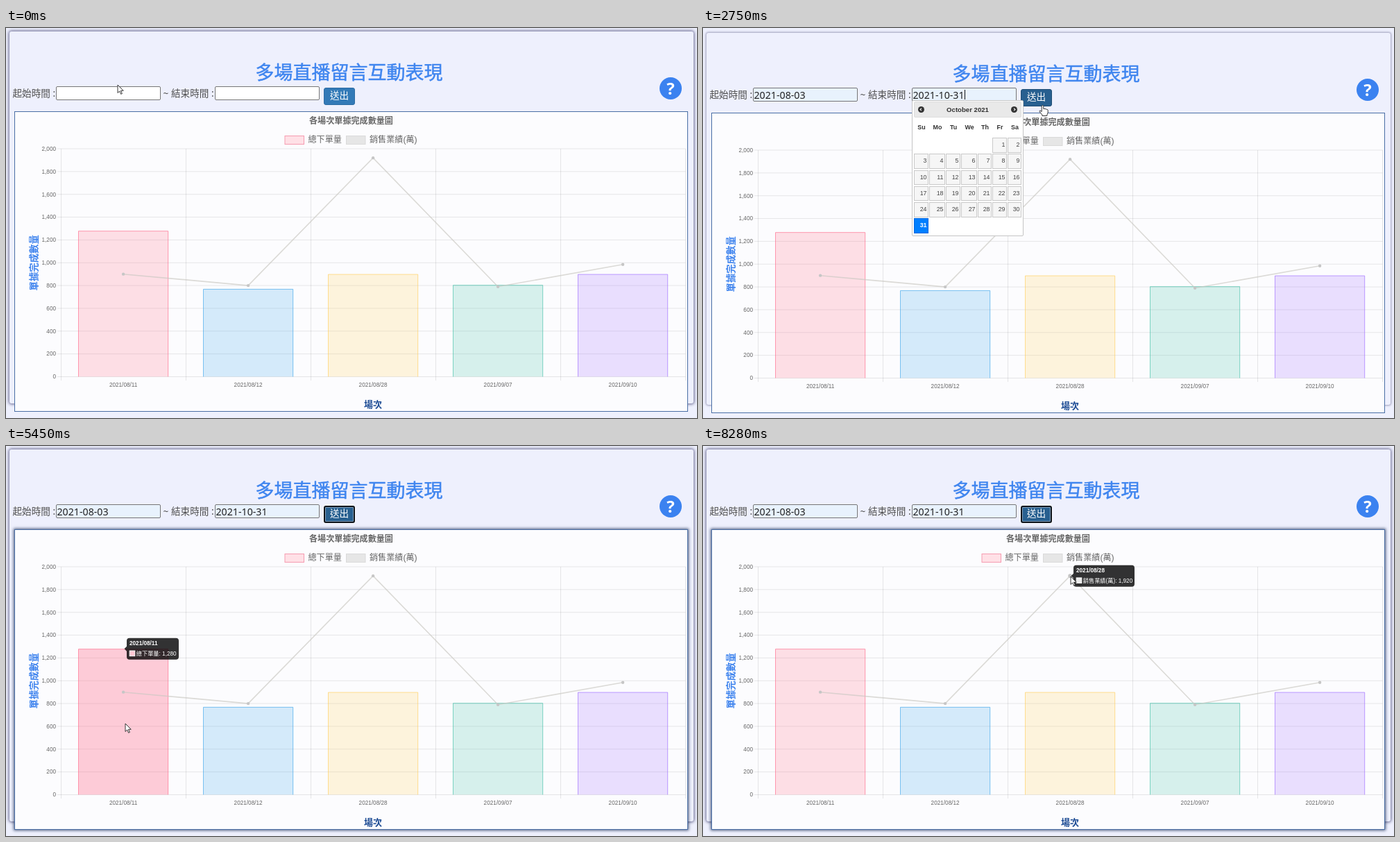
Recreate the animation shown at these times as an HTML page. Size 996 px wide and 562 px high, loop 8320 ms.

```html
<!DOCTYPE html>
<html lang="zh-Hant">
<head>
<meta charset="utf-8">
<title>多場直播留言互動表現</title>
<style>
  html, body { margin: 0; width: 100%; height: 100%; overflow: hidden; background: #eef0fd; }
  #stage { position: relative; width: 996px; height: 562px; overflow: hidden; }
  #stage div, svg { position: absolute; box-sizing: border-box; }
  svg { left: 0; top: 0; width: 996px; height: 562px; overflow: visible; }
  text { font-family: 'Liberation Sans', 'Noto Sans CJK TC', sans-serif; fill: #666; }
  .ui { font-family: 'Noto Sans', 'Noto Sans CJK TC', sans-serif; font-size: 13.6px; fill: #505050; }
  .mid { text-anchor: middle; }
  .bold { font-weight: 700; }
  .value { font-size: 14.2px; fill: #222; }
  .tick { font-size: 8.2px; }
  .legend { font-size: 12.1px; }
  .title { font-size: 27px; fill: #3f85ef; stroke: #3f85ef; stroke-width: .5px; }
  #page { inset: 0; }
  #card { left: 5px; top: 5px; width: 986px; height: 536px; border-radius: 3px; background: #eef0fd; }
  #panel { left: 12px; top: 120px; width: 971px; height: 433px; background: #fcfcfe; border: 1px solid #4a6ea5; }
  #panel.over { box-shadow: 0 0 4px 1px rgba(20, 40, 80, .75); }
  .field { top: 84px; width: 151px; height: 20px; background: #fff; border: 1px solid #767676; border-radius: 2px; }
  .field.filled { background: #e8f2fd; }
  .field.over { border: 2px solid #161616; box-shadow: 0 0 4px 1px rgba(0, 0, 0, .5); }
  #send { left: 458px; top: 86px; width: 45px; height: 25px; border-radius: 3px; background: #337ab7; border: 1px solid #2e6da4; }
  #send.over { background: #286090; border-color: #204d74; }
  #send.focus { border: 2px solid #10151c; box-shadow: inset 0 0 0 1px #7f9cb8, 0 0 0 1px rgba(255, 255, 255, .7); }
  .cal { top: 104px; width: 161px; background: #fff; border: 1px solid #c5c5c5; border-radius: 2px;
    font: 8.9px 'Liberation Sans', sans-serif; color: #454545; }
  .cal .head { left: 2px; top: 1px; width: 155px; height: 23px; border: 1px solid #ddd; border-radius: 2px;
    background: #e9e9e9; font: bold 9.6px/21px 'Liberation Sans', sans-serif; color: #333; text-align: center; }
  .cal .nav { top: 6px; width: 9px; height: 9px; border-radius: 50%; background: #333; }
  .cal .nav::after { content: ''; position: absolute; left: 3.4px; top: 2.8px; width: 2.2px; height: 2.2px;
    border: solid #fff; border-width: 0 0 1.2px 1.2px; transform: rotate(45deg); }
  .cal .next { transform: scaleX(-1); }
  .cal .wk { top: 30px; width: 24px; line-height: 16px; font-weight: bold; color: #333; text-align: center; }
  .cal .day { height: 21.6px; line-height: 19px; padding-right: 1.5px; text-align: right;
    background: #f6f6f6; border: 1px solid #c9c9c9; }
  .cal .day.on { background: #007fff; border-color: #0068e0; color: #fff; font-weight: bold; }
</style>
</head>
<body>
<div id="stage">
  <div id="page">
    <div id="card"></div>
    <div id="panel"></div>
    <div class="field" id="from" style="left:72px"></div>
    <div class="field" id="to" style="left:301px"></div>
    <div id="send"></div>
    <svg>
      <text class="ui mid title" x="494.5" y="73.5">多場直播留言互動表現</text>
      <text class="ui" x="9.5" y="99.2">起始時間 :</text>
      <text class="ui" x="226.5" y="99.2">~</text>
      <text class="ui" x="238" y="99.2">結束時間 :</text>
      <text class="ui value" id="fromText" x="73.5" y="99.5"></text>
      <text class="ui value" id="toText" x="302.5" y="99.5"></text>
      <path id="caret" stroke="#111" d=""/>
      <text class="ui mid" x="480.5" y="102.4" style="fill:#fff">送出</text>
      <circle cx="958" cy="87" r="16" fill="#3b82f0"/>
      <text class="ui mid bold" x="958" y="95.6" style="font-size:24px;fill:#fff">?</text>
      <text class="mid bold" x="497.5" y="137.6" font-size="12.1">各場次單據完成數量圖</text>
      <rect x="402" y="155.5" width="27.5" height="12" fill="#ffe0e6" stroke="#f59bb0"/>
      <text class="legend" x="435.5" y="165">總下單量</text>
      <rect x="490.5" y="155.5" width="27.5" height="12" fill="#e6e6e6" stroke="#dadada"/>
      <text class="legend" x="524" y="165">銷售業績(萬)</text>
      <text class="mid bold" font-size="13.4" transform="translate(44.6 338.3) rotate(-90)" style="fill:#3f84ee">單據完成數量</text>
      <text class="mid bold" x="529" y="547" font-size="13" style="fill:#1c4b94">場次</text>
      <g id="grid" stroke="#000" stroke-opacity=".1" stroke-width=".9"></g>
      <g id="labels"></g>
      <g id="bars" stroke-width=".9"></g>
      <path id="line" fill="none" stroke="#c9c8c2" stroke-opacity=".65" stroke-width="1.6"/>
      <g id="dots" fill="#c6c6c6"></g>
      <g id="tip">
        <path id="tipBox" fill="#000" fill-opacity=".8"/>
        <text class="tick bold" id="tipDate" x="4" y="-4.8" style="fill:#fff"></text>
        <rect id="tipKey" x="4.2" y="2.8" width="7.6" height="7.6" stroke="#fff"/>
        <text class="tick" id="tipText" x="13.8" y="9.6" style="fill:#fff"></text>
      </g>
    </svg>
  </div>
  <div class="cal" id="calFrom" style="left:72px"></div>
  <div class="cal" id="calTo" style="left:301px"></div>
  <svg>
    <g id="cursor" stroke-linejoin="round">
      <path id="arrow" fill="#fff" stroke="#222" stroke-width=".9" d="M0 0V11.5L2.7 9 4.6 13.3 6.4 12.5 4.5 8.3H8.2Z"/>
      <path id="beam" fill="none" stroke="#222" d="M-2.5-5H-.5L0-4.5.5-5H2.5M0-4.5V4.5M-2.5 5H-.5L0 4.5.5 5H2.5"/>
      <path id="hand" fill="#fff" stroke="#222" stroke-width=".9" d="M-1.3 1.2Q-1.3 0 0 0T1.3 1.2V5Q2.5 4.2 3.6 5.2 4.8 4.7 5.7 5.9 7.5 5.5 7.7 7.2V10.5L6.4 13.5V15H-.6V13.5L-4.2 9.3Q-5 7.8-3.6 7.5L-1.3 9Z"/>
    </g>
  </svg>
</div>
<script>
const LOOP = 8320;
const $ = id => document.getElementById(id);
const clamp = v => Math.max(0, Math.min(1, v));
const ramp = (t, start, span) => clamp((t - start) / span);
const smooth = v => v * v * (3 - 2 * v);
const outQuart = v => 1 - (1 - v) ** 4;
const mix = (a, b, k) => a + (b - a) * k;

// Moments of the clicks
const T = { openFrom: 400, prev: 850, pickFrom: 1120, openTo: 1740, next: 2080, pickTo: 2450, submit: 3320, redraw: 3473 };

// Pointer path: time, x, y
const path = [
  [0, 161, 82], [130, 161, 82], [330, 150, 93], [480, 150, 93], [700, 86, 117], [880, 86, 117],
  [1080, 131, 170], [1200, 131, 170], [1550, 356, 98], [1770, 356, 98], [2010, 449, 118], [2120, 449, 118],
  [2380, 314, 286], [2500, 314, 286], [2740, 489.5, 111.5], [2800, 489.5, 111.5], [3050, 496, 99],
  [3620, 496, 99], [4300, 547, 265], [4450, 547, 265], [4900, 180, 380], [5450, 172, 400],
  [5800, 340, 400], [6150, 351, 385], [6280, 351, 385], [6450, 530, 420], [6620, 710, 430],
  [6800, 880, 420], [6860, 880, 420], [7100, 710, 430], [7350, 530, 410], [7650, 530, 400],
  [7860, 530, 188], [LOOP, 530, 188]
];
function pointer(t) {
  const i = Math.max(1, path.findIndex(p => p[0] > t));
  const a = path[i - 1], b = path[i], k = smooth(ramp(t, a[0], b[0] - a[0]));
  return [mix(a[1], b[1], k), mix(a[2], b[2], k)];
}

// Chart
const dates = ['2021/08/11', '2021/08/12', '2021/08/28', '2021/09/07', '2021/09/10'];
const orders = [1280, 770, 900, 805, 900];
const sales = [900, 800, 1920, 790, 985];
const colors = ['255,99,132', '54,162,235', '255,205,86', '60,190,165', '153,102,255'];
const BASE = 502.5;
const yOf = v => BASE - v * 0.16425;
const xOf = i => 169.1 + i * 180;

function add(parent, tag, attrs, text) {
  const el = document.createElementNS('http://www.w3.org/2000/svg', tag);
  for (const k in attrs) el.setAttribute(k, attrs[k]);
  if (text) el.textContent = text;
  return parent.appendChild(el);
}
for (let v = 0; v <= 2000; v += 200) {
  add($('grid'), 'path', { d: `M74 ${yOf(v)}H979.5` });
  add($('labels'), 'text', { class: 'tick', 'text-anchor': 'end', x: 72, y: yOf(v) + 2.8 }, v.toLocaleString('en-US'));
}
for (let i = 0; i < 6; i++) add($('grid'), 'path', { d: `M${79.5 + i * 180} 174V508` });
const bars = dates.map((d, i) => {
  add($('labels'), 'text', { class: 'tick mid', x: xOf(i), y: 517 }, d);
  return add($('bars'), 'path', { stroke: `rgba(${colors[i]},.7)` });
});
const dots = dates.map((d, i) => add($('dots'), 'circle', { cx: xOf(i), r: 2.2 }));

function hit(t) {
  if (t < T.redraw + 700) return null;
  const [x, y] = pointer(t);
  for (let i = 0; i < 5; i++) {
    if (Math.hypot(x - xOf(i), y - yOf(sales[i])) < 4) return { i, line: true };
  }
  const i = orders.findIndex((v, n) => Math.abs(x - xOf(n)) < 65 && y > yOf(v) && y < BASE);
  return i < 0 ? null : { i, line: false };
}
const same = (a, b) => a === b || (a && b && a.i === b.i && a.line === b.line);

// Changes of the hovered item, each with the tooltip shown before it
const hovers = [{ t: 0, item: null, last: null }];
for (let t = 0; t < LOOP; t += 10) {
  const prev = hovers[hovers.length - 1], item = hit(t);
  if (!same(item, prev.item)) hovers.push({ t, item, last: prev.item || prev.last, shown: !!prev.item });
}

const valueOf = it => (it.line ? sales : orders)[it.i];
const tipWidth = it => it.line ? 88 : it.i === 0 ? 75 : 68;
function tipPlace(it) {
  return [it.i < 3 ? xOf(it.i) + 4.9 : xOf(it.i) - 4.9 - tipWidth(it), yOf(valueOf(it))];
}
function drawTip(t) {
  const h = hovers.filter(e => e.t <= t).pop();
  const it = h.item || h.last;
  const fade = ramp(t, h.t, 150);
  const alpha = h.item ? (h.shown ? 1 : fade) : (it ? 1 - fade : 0);
  $('tip').style.opacity = alpha;
  if (alpha) {
    const to = tipPlace(it), from = h.last ? tipPlace(h.last) : to;
    const k = outQuart(ramp(t, h.t, 400)), w = tipWidth(it);
    $('tip').setAttribute('transform', `translate(${mix(from[0], to[0], k)} ${mix(from[1], to[1], k)})`);
    const nose = it.i < 3 ? 'M0-3.4L-3.4 0 0 3.4Z' : `M${w}-3.4l3.4 3.4-3.4 3.4Z`;
    $('tipBox').setAttribute('d', `M4-15.5H${w - 4}q4 0 4 4V11.5q0 4-4 4H4q-4 0-4-4V-11.5q0-4 4-4Z${nose}`);
    $('tipDate').textContent = dates[it.i];
    $('tipKey').setAttribute('fill', it.line ? '#ececec' : `rgb(${colors[it.i].split(',').map(c => mix(255, +c, .35))})`);
    $('tipText').textContent = (it.line ? '銷售業績(萬): ' : '總下單量: ') + valueOf(it).toLocaleString('en-US');
  }
  return h.item;
}
function drawChart(t) {
  const grow = t < T.redraw ? 1 : outQuart(ramp(t, T.redraw, 1000));
  const over = drawTip(t);
  bars.forEach((bar, i) => {
    const on = over && !over.line && over.i === i;
    bar.setAttribute('d', `M${xOf(i) - 64.6} ${BASE}V${yOf(orders[i] * grow) + .4}h129.2V${BASE}`);
    bar.setAttribute('fill', `rgba(${colors[i]},${on ? .32 : .2})`);
  });
  $('line').setAttribute('d', 'M' + sales.map((v, i) => `${xOf(i)} ${yOf(v * grow)}`).join('L'));
  dots.forEach((dot, i) => {
    dot.setAttribute('cy', yOf(sales[i] * grow));
    dot.setAttribute('r', over && over.line && over.i === i ? 2.8 : 2.2);
  });
}

// Calendars
const colX = [2, 24, 48, 70, 94, 115, 137, 158];
const months = ['August', 'September', 'October'];
function fillCal(el, month, picked) {
  const key = month + '/' + picked;
  if (el.dataset.key === key) return;
  el.dataset.key = key;
  const first = new Date(2021, month, 1).getDay(), count = new Date(2021, month + 1, 0).getDate();
  let html = `<div class="head">${months[month - 7]} 2021<div class="nav" style="left:5px"></div><div class="nav next" style="right:5px"></div></div>`;
  ['Su', 'Mo', 'Tu', 'We', 'Th', 'Fr', 'Sa'].forEach((d, i) => {
    html += `<div class="wk" style="left:${(colX[i] + colX[i + 1]) / 2 - 12}px">${d}</div>`;
  });
  for (let d = 1; d <= count; d++) {
    const n = first + d - 1, c = n % 7, r = Math.floor(n / 7);
    html += `<div class="day${d === picked ? ' on' : ''}" style="left:${colX[c]}px;top:${53.2 + r * 23.2}px;width:${colX[c + 1] - colX[c] - 1}px">${d}</div>`;
  }
  el.innerHTML = html;
  el.style.height = 57.2 + Math.ceil((first + count) / 7) * 23.2 + 'px';
}
function showCal(el, alpha) {
  el.style.opacity = alpha;
  el.style.visibility = alpha ? 'visible' : 'hidden';
}

function draw(t) {
  const [x, y] = pointer(t);
  const inside = (l, top, r, b) => x >= l && x <= r && y >= top && y <= b;

  fillCal($('calFrom'), t < T.prev ? 8 : 7, t < T.pickFrom ? 0 : 3);
  fillCal($('calTo'), t < T.next ? 8 : 9, t < T.pickTo ? 0 : 31);
  showCal($('calFrom'), ramp(t, T.openFrom, 150) * (1 - ramp(t, T.openTo, 150)));
  showCal($('calTo'), ramp(t, T.openTo, 150) * (1 - ramp(t, T.submit, 198)));

  const inCal = (t > T.openFrom && t < T.openTo && inside(72, 105, 233, 277)) ||
    (t > T.openTo && t < T.submit && inside(301, 105, 462, 300));
  const onFrom = !inCal && inside(72, 84, 223, 104.9);
  const onTo = !inCal && inside(301, 84, 452, 104.9);
  const onSend = inside(458, 86, 503, 113);

  // The page sinks a little while the pointer is over a calendar
  const sink = smooth(ramp(t, 600, 200)) - smooth(ramp(t, 1370, 250)) + smooth(ramp(t, 1860, 200)) - smooth(ramp(t, 2760, 250));
  $('page').style.transform = `translateY(${2 * sink}px)`;
  $('card').style.boxShadow = `0 0 ${mix(4, 3, sink)}px 1px rgba(50,50,100,${mix(.75, .45, sink)})`;

  $('from').className = 'field' + (t >= T.pickFrom ? ' filled' : '') + (onFrom ? ' over' : '');
  $('to').className = 'field' + (t >= T.pickTo ? ' filled' : '') + (onTo ? ' over' : '');
  $('fromText').textContent = t >= T.pickFrom ? '2021-08-03' : '';
  $('toText').textContent = t >= T.pickTo ? '2021-10-31' : '';
  $('send').className = (onSend || t >= T.submit ? 'over' : '') + (t >= T.submit ? ' focus' : '');
  $('panel').className = !inCal && inside(12, 120, 983, 553) ? 'over' : '';

  const second = t >= T.openTo;
  const since = [T.openFrom, T.pickFrom, T.openTo, T.pickTo].filter(v => v <= t).pop();
  const blink = since !== undefined && t < T.submit && (t - since) % 1000 < 500;
  const filled = second ? t >= T.pickTo : t >= T.pickFrom;
  $('caret').setAttribute('d', blink ? `M${(second ? 303.5 : 74.5) + (filled ? 74 : 0)} 87V101` : '');

  drawChart(t);

  const shape = onSend || inCal ? 'hand' : onFrom || onTo ? 'beam' : 'arrow';
  for (const id of ['arrow', 'beam', 'hand']) $(id).style.display = id === shape ? '' : 'none';
  $('cursor').setAttribute('transform', `translate(${x} ${y})`);
}

const start = performance.now();
function frame() {
  draw((performance.now() - start) % LOOP);
  requestAnimationFrame(frame);
}
frame();
</script>
</body>
</html>
```
